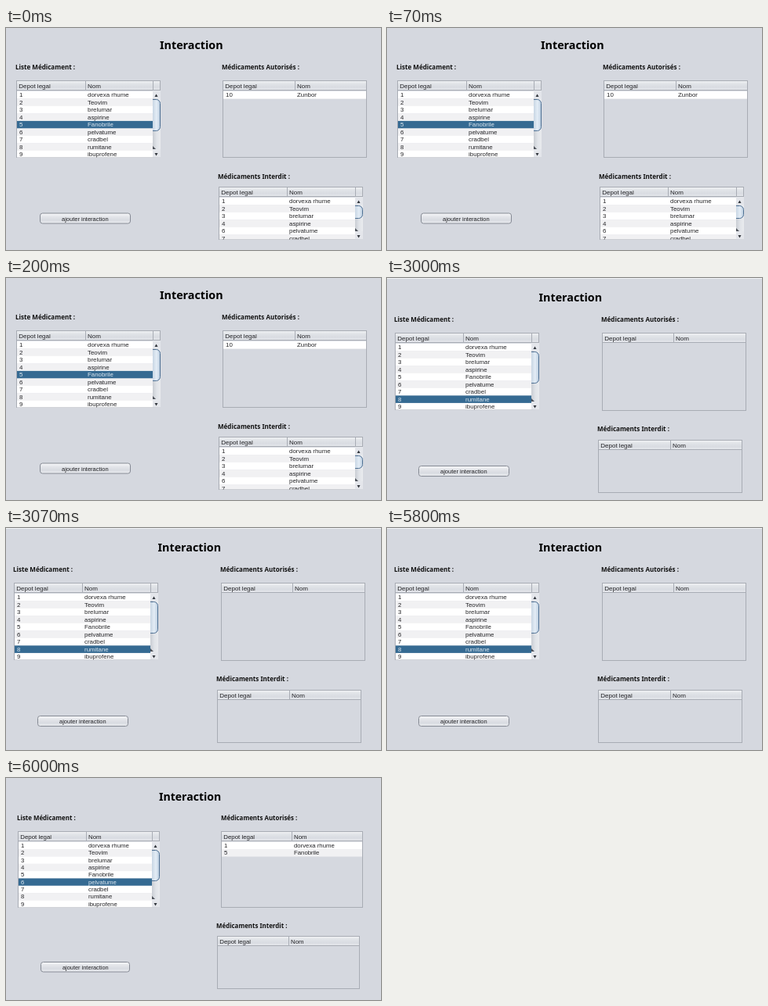
These frames come from a looping animation (478x284 px, 8990 ms). An HTML page with a canvas:

```html
<!DOCTYPE html>
<html lang="fr">
<head>
<meta charset="utf-8">
<title>Interaction</title>
<style>
html, body { margin: 0; width: 100%; height: 100%; overflow: hidden; background: #d5d8df; }
canvas { display: block; width: 478px; height: 284px; }
</style>
</head>
<body>
<canvas id="stage"></canvas>
<script>
const W = 478, H = 284, LOOP = 8990;
const canvas = document.getElementById('stage');
const ctx = canvas.getContext('2d');
const ratio = window.devicePixelRatio || 1;
canvas.width = Math.round(W * ratio);
canvas.height = Math.round(H * ratio);

const BOLD = '"Noto Sans", "Open Sans", sans-serif';
const PLAIN = '"Liberation Sans", Arial, sans-serif';
const BG = '#d5d8df', LINE = '#a8acb4', INK = '#242427', BLUE = '#356a92';

const drugs = ['dorvexa rhume', 'Teovim', 'brelumar', 'aspirine', 'Fanobrile',
  'pelvatume', 'cradbel', 'rumitane', 'ibuprofene', 'Zunbor'];
const all = [1, 2, 3, 4, 5, 6, 7, 8, 9];

// Table boxes: x, y, width, height, column divider
const scenes = [
  {
    start: 0, title: [196, 27.4], scale: 1,
    labels: [[12, 53.2], [275, 53.2], [270, 193]],
    button: [43, 236.5, 116, 14],
    tables: [
      { box: [13, 67, 184, 99, 101], rows: all, selected: 5, thumb: [24, 41] },
      { box: [276, 67, 184, 99, 368], rows: [10] },
      { box: [271, 203, 184, 68, 358], rows: [1, 2, 3, 4, 6, 7], thumb: [24, 17] }
    ]
  },
  {
    start: 3000, title: [193.5, 30.4], scale: 1, topLine: true,
    labels: [[9, 55.8], [273, 55.8], [268, 196]],
    button: [40, 240, 116, 14],
    tables: [
      { box: [10, 70, 184, 99, 97], rows: all, selected: 8, thumb: [24, 41] },
      { box: [274, 70, 184, 100, 365], rows: [] },
      { box: [269, 207, 184, 68, 361], rows: [] }
    ]
  },
  {
    start: 6000, title: [195, 28.8], scale: 0.984,
    labels: [[14, 53.8], [274, 53.8], [268, 192]],
    button: [44, 235, 114, 13.5],
    tables: [
      { box: [15, 68, 181, 98, 102], rows: all, selected: 6, thumb: [24, 40] },
      { box: [274, 68, 181, 98, 364], rows: [1, 5] },
      { box: [269, 202, 182, 68, 360], rows: [] }
    ]
  }
];
const captions = ['Liste Médicament :', 'Médicaments Autorisés :', 'Médicaments Interdit :'];

function rect(x, y, w, h, fill) {
  ctx.fillStyle = fill;
  ctx.fillRect(x, y, w, h);
}

function frame(x, y, w, h, color) {
  ctx.strokeStyle = color;
  ctx.lineWidth = 1;
  ctx.strokeRect(x + 0.5, y + 0.5, w - 1, h - 1);
}

function text(str, x, y, font, color = INK) {
  ctx.font = font;
  ctx.fillStyle = color;
  ctx.fillText(str, x, y);
}

function shade(x0, y0, x1, y1, ...colors) {
  const g = ctx.createLinearGradient(x0, y0, x1, y1);
  colors.forEach((c, i) => g.addColorStop(i / (colors.length - 1), c));
  return g;
}

function triangle(color, ...points) {
  ctx.fillStyle = color;
  ctx.beginPath();
  points.forEach(p => ctx.lineTo(...p));
  ctx.fill();
}

function arrow(x, y, dir) {
  const base = y - dir * 1.5;
  triangle('#30343b', [x - 2, base], [x + 2, base], [x, y + dir * 2]);
}

function scrollbar(x, y, h, thumbTop, length) {
  const w = 10, right = x + w - 0.5, end = y + h - 11;
  rect(x, y, w, h, shade(x, 0, x + w, 0, '#c9cdd3', '#e0e3e8', '#e9ebee'));
  rect(x, y, w, 10, '#e4e6eb');
  rect(x, end, w, 11, '#e4e6eb');
  triangle('#4c5058', [x, end - 4], [x + 4, end], [x, end]);

  // The thumb is outlined on its rounded side only
  const top = thumbTop + 0.5, bottom = thumbTop + length - 0.5;
  ctx.beginPath();
  ctx.moveTo(x, top);
  ctx.arcTo(right, top, right, bottom, 5);
  ctx.arcTo(right, bottom, x, bottom, 5);
  ctx.lineTo(x, bottom);
  ctx.fillStyle = shade(x, 0, x + w, 0, '#c8d6e4', '#e4edf6', '#b4c8dc');
  ctx.fill();
  ctx.strokeStyle = '#4f7093';
  ctx.lineWidth = 1;
  ctx.stroke();

  arrow(x + 4.5, y + 6.5, -1);
  arrow(x + 4.5, y + h - 4.5, 1);
}

function table({ box: [x, y, w, h, split], rows, selected, thumb }, scale) {
  const head = 13.9 * scale, pitch = 9.5 * scale;
  const right = thumb ? x + w - 10 : x + w - 1;
  const cell = `${7.9 * scale}px ${PLAIN}`;
  const headFont = `${8 * scale}px ${PLAIN}`;

  frame(x, y, w, h, LINE);
  ctx.save();
  ctx.beginPath();
  ctx.rect(x, y, w, h - 0.5);
  ctx.clip();
  rows.forEach((id, i) => {
    const ry = y + head + i * pitch;
    const active = id === selected;
    const fill = active ? BLUE : i % 2 ? '#f1f1f3' : '#ffffff';
    rect(x + 1, ry, right - x - 1, pitch + 0.2, fill);
    const color = active ? '#dfe9f1' : INK;
    text(String(id), x + 4, ry + 7.3 * scale, cell, color);
    text(drugs[id - 1], split + 3, ry + 7.3 * scale, cell, color);
  });

  const hh = Math.round(head) - 1;
  rect(x, y, w, hh, shade(0, y, 0, y + hh, '#f3f4f6', '#e1e4e8', '#d9dce2', '#e8eaee'));
  rect(x, y + hh - 1, w, 1, '#a5a9b1');
  frame(x, y, w, hh, LINE);
  rect(split, y + 1, 1, hh - 1, '#a9adb5');
  if (thumb) {
    rect(right, y + 1, 1, hh - 1, '#a9adb5');
    scrollbar(right, y + hh, h - hh, y + thumb[0], thumb[1]);
  }
  text('Depot legal', x + 3.3, y + 9.7, headFont);
  text('Nom', split + 3, y + 9.7, headFont);
  ctx.restore();
}

function button([x, y, w, h], scale) {
  ctx.beginPath();
  ctx.roundRect(x + 0.5, y + 0.5, w - 1, h - 1, 3);
  ctx.fillStyle = shade(0, y, 0, y + h, '#fafbfc', '#e4e6ea', '#d8dbe1', '#eff0f3');
  ctx.fill();
  ctx.strokeStyle = '#858a94';
  ctx.lineWidth = 1;
  ctx.stroke();
  text('ajouter interaction', x + 28, y + 10, `${7.5 * scale}px ${PLAIN}`);
}

function draw(scene) {
  const { scale } = scene;
  ctx.setTransform(canvas.width / W, 0, 0, canvas.height / H, 0, 0);
  rect(0, 0, W, H, BG);
  if (scene.topLine) rect(0, 0, W, 1, '#eff1f4');
  text('Interaction', ...scene.title, `bold ${14.3 * scale}px ${BOLD}`, '#000');
  captions.forEach((c, i) =>
    text(c, ...scene.labels[i], `bold ${8.05 * scale}px ${BOLD}`, '#111'));
  scene.tables.forEach(t => table(t, scale));
  button(scene.button, scale);
}

const origin = performance.now();
function tick() {
  const t = (performance.now() - origin) % LOOP;
  draw(scenes.findLast(s => t >= s.start) || scenes[0]);
  requestAnimationFrame(tick);
}
tick();
</script>
</body>
</html>
```
